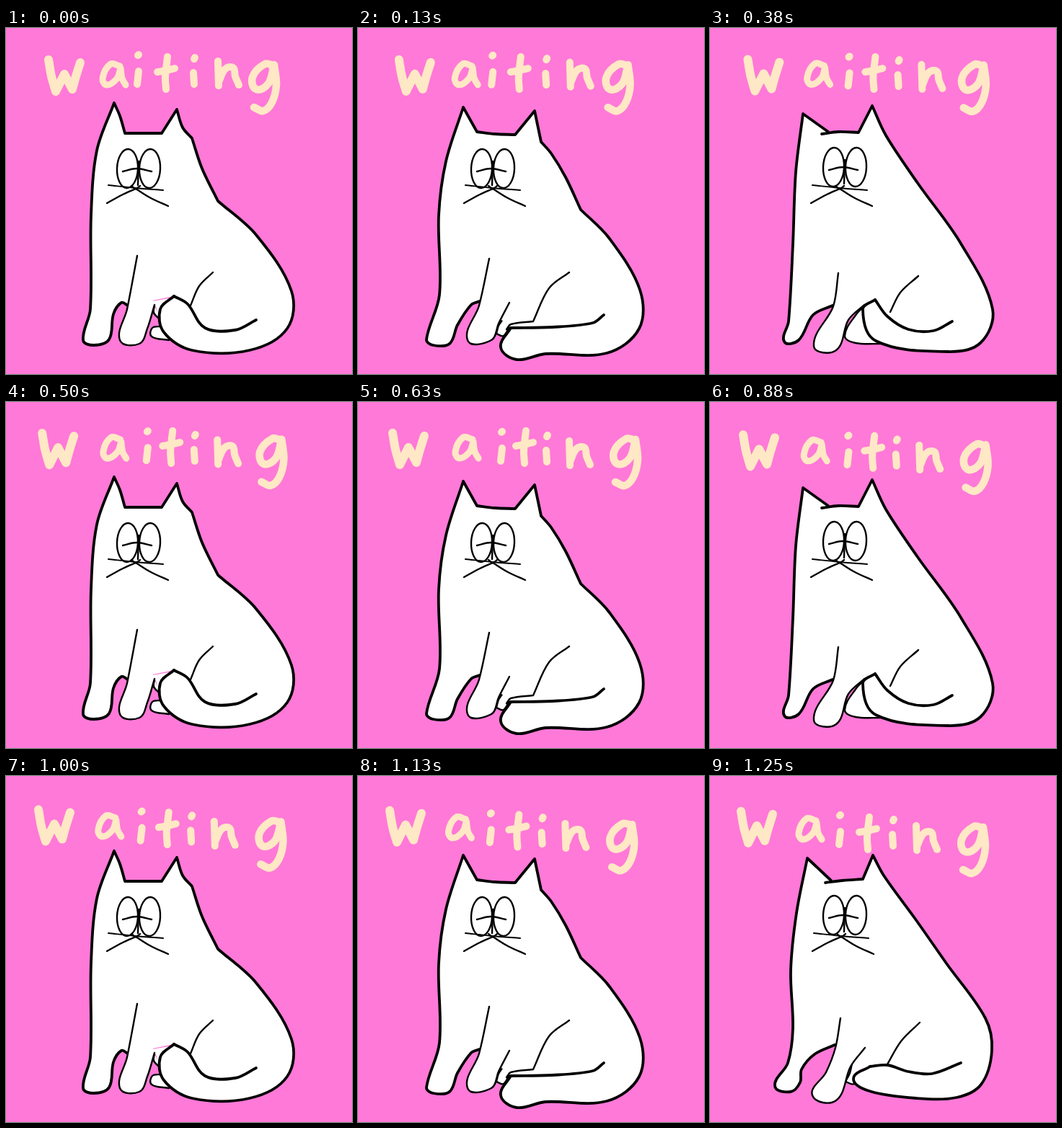
An HTML page with a canvas for the animation above (1.37 s loop, 480 by 480 pixels).

```html
<!DOCTYPE html>
<html lang="en">
<head>
<meta charset="utf-8">
<title>Waiting cat</title>
<style>
html, body { margin: 0; height: 100%; overflow: hidden; background: #ff79d8; }
canvas { display: block; }
</style>
</head>
<body>
<canvas id="stage" width="480" height="480"></canvas>
<script>
const ctx = document.getElementById('stage').getContext('2d');
const LOOP = 1370, BOLD = 3.8, FINE = 2.4;

// Curves are "x y" key points; "|" separates smooth pieces.
const POSES = [
  { // upright, tail curled up
    belly: '169 385 206 385 214 404 232 374',
    foot: '206 385 205 395 213 404 | 216 414 203 416 202 428 226 433',
    body: '169 385 160 381 149 397 143 432 122 440 107 433 117 390 118 260 126 170 150 104' +
      '| 150 104 158 122 165 146 | 165 146 216 146 | 216 146 237 113 | 237 113 245 138 258 153' +
      '| 258 153 272 195 294 240 | 294 240 347 287 396 365 390 417 338 447 258 447 219 422 214 390 233 372',
    leg: '182 316 168 390 158 433 185 438 196 417 206 384',
    tail: '233 372 252 383 276 416 318 419 347 405',
    haunch: '256 385 268 358 287 339',
    face: [184, 195, 180]
  },
  { // low, tail flat on the floor
    belly: '169 379 210 381 242 407 212 416',
    foot: '201 404 195 413 192 424 | 192 424 202 427 211 411',
    body: '169 379 157 384 138 412 127 438 104 440 95 432 113 370 112 260 122 185 146 110' +
      '| 146 110 165 144 | 165 144 190 147 218 148 | 218 148 245 115 | 245 115 254 158' +
      '| 254 158 268 174 288 207 309 252 | 309 252 348 291 391 363 390 417 345 451 260 452 ' +
      '220 460 198 443 212 416',
    leg: '182 320 168 385 152 433 185 433 195 410 210 381',
    tail: '212 416 270 415 326 409 341 398',
    haunch: '293 339 265 361 243 407 | 243 407 212 411 206 418',
    face: [187, 195, 187]
  },
  { // stretched forward, tail flat
    belly: '174 374 215 378 246 400 222 403 203 409',
    foot: '197 399 194 412 188 424 | 188 424 200 427 208 410',
    body: '173 373 145 386 127 407 125 425 112 438 90 430 108 398 115 350 112 270 120 190 135 114' +
      '| 135 114 168 145 | 160 148 184 145 212 143 | 212 143 226 110 | 226 110 241 138 286 200 ' +
      '328 260 382 336 391 381 376 428 342 446 286 447 221 437 199 420 222 403',
    leg: '181 336 174 377 161 411 142 443 175 450 195 403 215 377',
    tail: '222 403 246 401 275 410 308 413 348 398',
    haunch: '246 400 265 368 291 342',
    face: [187, 193, 182]
  },
  { // leaning, tail raised
    belly: '170 385 214 385 229 377',
    foot: '214 386 203 397 187 427 202 437 240 438',
    body: '170 385 143 398 123 433 103 435 109 407 115 300 119 200 129 119' +
      '| 129 119 164 144 | 155 147 178 144 206 145 | 206 145 225 108 | 225 108 244 149 ' +
      '288 215 348 299 392 390 375 437 330 449 230 434 212 390 229 377',
    leg: '178 340 171 386 144 441 175 447 192 405 214 384',
    tail: '229 377 246 400 275 418 310 420 336 407',
    haunch: '250 394 264 367 289 344',
    face: [187, 193, 180]
  }
];

// Each letter drifts through three places: first, middle and last step of the loop.
const LETTERS = [
  { pen: 12, path: [[81, 67], [70, 66], [65, 72]],
    glyph: '-22 -23 -18 0 -12 21 | -12 21 0 -3 | 0 -3 11 18 | 11 18 16 0 22 -19' },
  { pen: 9, path: [[149, 65], [150, 64], [138, 74]],
    glyph: '9 -12 -4 -15 -15 5 -9 14 5 5 10 -9 | 10 -9 12 5 17 14' },
  { pen: 10, path: [[183, 58], [199, 62], [180, 75]], glyph: '1 -21 0 -20 | 1 2 -1 20' },
  { pen: 10, path: [[222, 62], [231, 62], [219, 79]], glyph: '2 -22 -1 6 0 23 | -12 -1 0 -3 12 -6' },
  { pen: 10, path: [[261, 60], [262, 65], [254, 79]], glyph: '1 -19 0 -17 | -1 2 0 18' },
  { pen: 10, path: [[308, 63], [307, 71], [300, 86]],
    glyph: '-14 -17 -13 17 | -13 12 -4 -6 7 -8 10 4 15 16' },
  { pen: 10.5, path: [[357, 80], [370, 81], [364, 100]],
    glyph: '14 -28 2 -30 -15 -12 -10 5 7 -3 15 -29 | 15 -29 18 -1 12 23 0 35 -13 30' }
];

function parse(text) {
  return text.split('|').map(piece => {
    const n = piece.trim().split(/\s+/).map(Number);
    return Array.from({ length: n.length / 2 }, (_, i) => [n[2 * i], n[2 * i + 1]]);
  });
}

// Bezier handle at b, parallel to a-c, with a third of the segment's length.
function handle(a, b, c, length) {
  const k = length / 3 / Math.hypot(c[0] - a[0], c[1] - a[1]);
  return [b[0] + (c[0] - a[0]) * k, b[1] + (c[1] - a[1]) * k];
}

function trace(text, joined) {
  const path = new Path2D();
  parse(text).forEach((p, n) => {
    path[joined && n ? 'lineTo' : 'moveTo'](...p[0]);
    for (let i = 0; i < p.length - 1; i++) {
      const b = p[i], c = p[i + 1], a = p[i - 1] || b, d = p[i + 2] || c;
      const length = Math.hypot(c[0] - b[0], c[1] - b[1]);
      path.bezierCurveTo(...handle(a, b, c, length), ...handle(d, c, b, length), ...c);
    }
  });
  return path;
}

function line(text, width) {
  ctx.lineWidth = width;
  ctx.stroke(trace(text));
}

function solid(text, width) {
  ctx.fill(trace(text, true));
  line(text, width);
}

function drawFace(x, y, nose) {
  for (const side of [-1, 1]) {
    ctx.beginPath();
    ctx.ellipse(x + side * 15.5, y, 14.5, 27, 0.04, 0, 2 * Math.PI);
    ctx.stroke();
  }
  line(`${x - 22} ${y + 4} ${x - 3} ${y} ${x + 18} ${y + 4}`, FINE);
  line(`${x} ${y - 10} ${x - 1} ${y + 23}`, FINE);
  ctx.save();
  ctx.translate(nose, 223);
  line('-38 -5 0 -1 38 2', 2);
  line('-40 20 -20 9 0 0 | 0 0 21 13 45 24', FINE);
  line('-6 -4 0 0 6 -4', FINE);
  ctx.restore();
}

function drawCat({ belly, foot, body, leg, tail, haunch, face }) {
  ctx.fillStyle = '#fff';
  ctx.strokeStyle = '#000';
  ctx.fill(trace(belly));
  solid(foot, FINE);
  solid(body, BOLD);
  solid(leg, FINE);
  line(tail, BOLD);
  line(haunch, FINE);
  drawFace(...face);
}

function drawLetter({ pen, path, glyph }, step) {
  const leg = step < 5 ? 0 : 1;
  const part = step / 5 - leg;
  const [x, y] = path[leg].map((v, i) => v + (path[leg + 1][i] - v) * part);
  ctx.save();
  ctx.translate(x, y);
  line(glyph, pen);
  ctx.restore();
}

function draw() {
  const t = (performance.now() - start) % LOOP;
  // Eight steps a second, on a clock that ticks every 10 ms.
  const step = Math.floor(Math.floor(t / 10) / 12.5);
  ctx.fillStyle = '#ff79d8';
  ctx.fillRect(0, 0, 480, 480);
  drawCat(POSES[step % POSES.length]);
  ctx.strokeStyle = '#ffe8c5';
  LETTERS.forEach(letter => drawLetter(letter, step));
  requestAnimationFrame(draw);
}

ctx.lineCap = ctx.lineJoin = 'round';
const start = performance.now();
draw();
</script>
</body>
</html>
```
